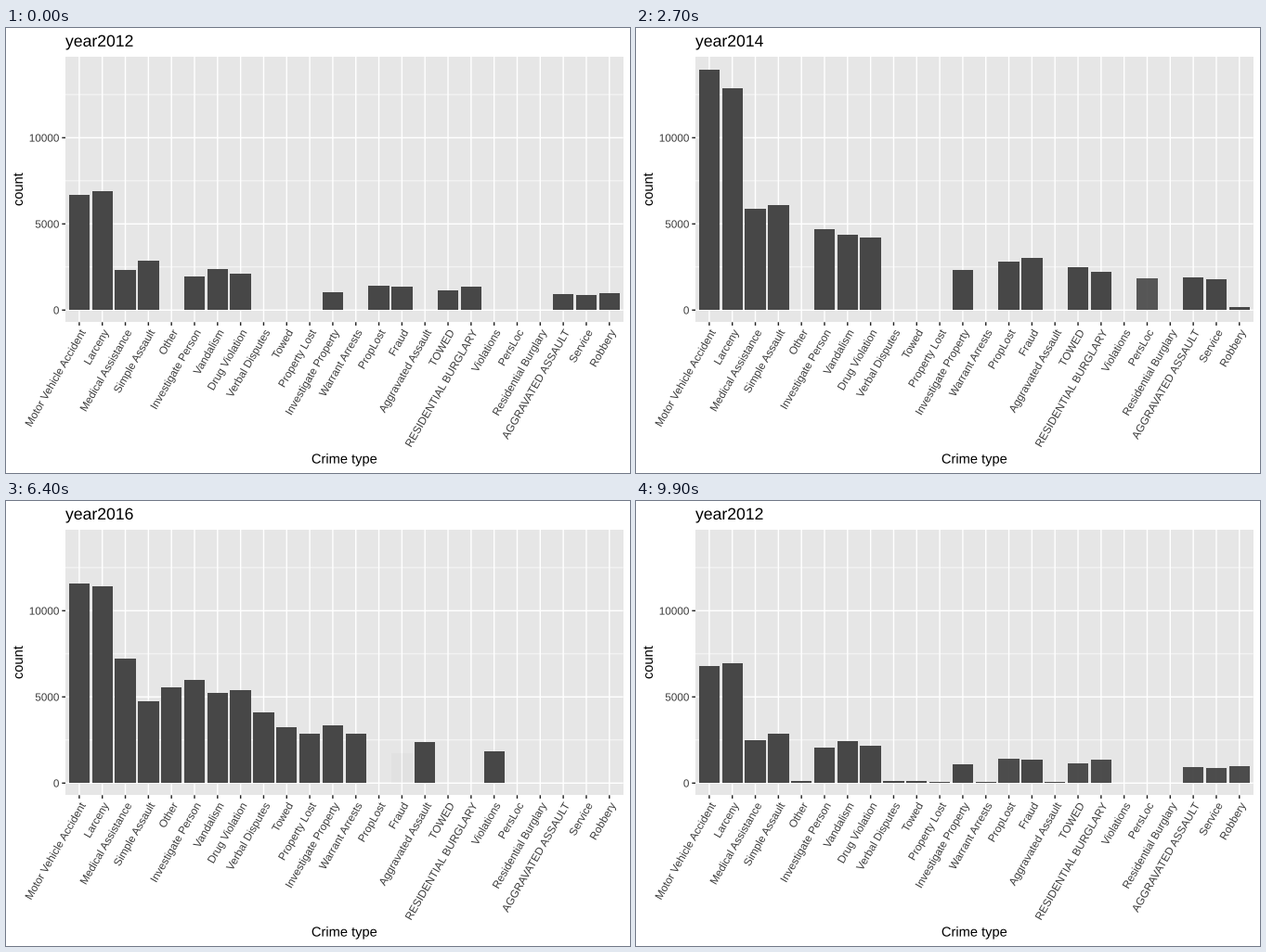
Write a matplotlib script that moves like this. It is 672x480 px and loops after 10 s.

```python
import math

import matplotlib.pyplot as plt
import numpy as np
from matplotlib.animation import FuncAnimation
from matplotlib.patches import PathPatch, Rectangle
from matplotlib.textpath import TextPath
from matplotlib.transforms import Affine2D

plt.rcParams["font.family"] = "Liberation Sans"

W, H, DPI = 672, 480, 96
PT = DPI / 72
LEFT, RIGHT, TOP, BOTTOM = 64.0, 664.67, 31.0, 317.3
Y_MAX = 14000
PANEL, BAR, TICK, LABEL = "#e6e6e6", "#474747", "#242424", "#3b3b3b"

YEARS = range(2012, 2019)
LAST_FULL = 2017
SHARE = {2012: 0.5, 2018: 0.86}  # parts of a year on record
TOP_N = 15                       # bars shown per year

ALL, OLD, NEW = (2012, 2017), (2012, 2014), (2015, 2017)

# category, span of years, yearly rates at even steps across the span
SERIES = [
    ("Motor Vehicle Accident", ALL, [13380, 13610, 14000, 12715, 11546, 12030]),
    ("Larceny", ALL, [13760, 12680, 12920, 13605, 11455, 10995]),
    ("Medical Assistance", ALL, [4700, 7820]),
    ("Simple Assault", ALL, [5700, 6110, 6077, 5885, 4725, 4915]),
    ("Other", NEW, [4086, 5547, 5350]),
    ("Investigate Person", ALL, [3880, 4950, 6640]),
    ("Vandalism", ALL, [4720, 4100, 5500, 4800]),
    ("Drug Violation", ALL, [4180, 3850, 5900, 4750]),
    ("Verbal Disputes", NEW, [1884, 4070, 4430]),
    ("Towed", NEW, [1920, 3208, 3935]),
    ("Property Lost", NEW, [1911, 2862, 3130]),
    ("Investigate Property", ALL, [2040, 2450, 3945]),
    ("Warrant Arrests", (2016, 2017), [2841, 3155]),
    ("PropLost", OLD, [2820]),
    ("Fraud", ALL, [2680, 3300, 2020, 1726]),
    ("Aggravated Assault", NEW, [1761, 2378, 2437]),
    ("TOWED", OLD, [2340, 2480]),
    ("RESIDENTIAL BURGLARY", OLD, [2700, 2185]),
    ("Violations", (2016, 2016), [1920]),
    ("PersLoc", (2014, 2014), [1840]),
    ("Residential Burglary", (2015, 2015), [1773]),
    ("AGGRAVATED ASSAULT", OLD, [1910]),
    ("Service", OLD, [1785]),
    ("Robbery", (2012, 2013), [1930]),
]

HOLD = 5  # still frames before each move

STEP = (RIGHT - LEFT) / (len(SERIES) + 0.2)
BAR_W = 0.9 * STEP
UNIT = (BOTTOM - TOP) / (1.1 * Y_MAX)
ZERO = BOTTOM - 0.05 * Y_MAX * UNIT


def x_pos(i):
    return LEFT + (i + 0.6) * STEP


def y_pos(value):
    return ZERO - value * UNIT


def count(span, rates, year):
    first, last = span
    y = min(year, LAST_FULL)
    if not first <= y <= last:
        return 0
    rate = np.interp(y, np.linspace(first, last, len(rates)), rates)
    return rate * SHARE.get(year, 1)


def top_counts(year):
    row = np.array([count(span, rates, year) for _, span, rates in SERIES])
    return np.where(row >= np.sort(row)[-TOP_N], row, 0)


fig = plt.figure(figsize=(W / DPI, H / DPI), dpi=DPI, facecolor="white")
ax = fig.add_axes([0, 0, 1, 1])
ax.set_xlim(0, W)
ax.set_ylim(H, 0)
ax.axis("off")


def line(xs, ys, color, px, z):
    ax.plot(xs, ys, color=color, lw=px / PT, solid_capstyle="butt",
            zorder=z, snap=False)


def box(x, y, w, h, color, z):
    return ax.add_patch(Rectangle((x, y), w, h, facecolor=color, lw=0,
                                  zorder=z, snap=True))


def advance(text, px):
    def ink_end(s):
        return TextPath((0, 0), s, size=px).get_extents().x1
    return ink_end(text + "l") - ink_end("l")


def label(x, y, text, pt, color="black", align=0.0, angle=0):
    """Text as an outline, so it can sit between pixels."""
    px = pt * PT
    path = TextPath((-align * advance(text, px), 0), text, size=px)
    place = Affine2D().scale(1, -1).rotate_deg(-angle).translate(x, y)
    return ax.add_patch(PathPatch(path, facecolor=color, lw=0, zorder=4,
                                  snap=False, transform=place + ax.transData))


box(LEFT, TOP, RIGHT - LEFT, BOTTOM - TOP, PANEL, 0)
for v in range(2500, Y_MAX, 5000):
    line([LEFT, RIGHT], [y_pos(v)] * 2, "white", 0.71, 1)

CAP = 0.718 * 8.8 * PT
for v in range(0, Y_MAX, 5000):
    y = y_pos(v)
    line([LEFT, RIGHT], [y, y], "white", 1.42, 1)
    line([LEFT - 3.67, LEFT], [y, y], TICK, 1.42, 3)
    label(LEFT - 6.6, y + CAP / 2, str(v), 8.8, LABEL, align=1)

tilt = math.radians(60)
for i, (name, _, _) in enumerate(SERIES):
    x = x_pos(i)
    line([x, x], [TOP, BOTTOM], "white", 1.42, 1)
    line([x, x], [BOTTOM, BOTTOM + 3.67], TICK, 1.42, 3)
    label(x + CAP * math.sin(tilt), BOTTOM + 6.6 + CAP * math.cos(tilt),
          name, 8.8, LABEL, align=1, angle=60)

label((LEFT + RIGHT) / 2, 469.6, "Crime type", 11, align=0.5)
label(17.9, (TOP + BOTTOM) / 2, "count", 11, align=0.5, angle=90)
titles = [label(LEFT, 19.9, f"year{year}", 13.2) for year in YEARS]

table = [top_counts(year) for year in YEARS]
bars = [box(x_pos(i) - BAR_W / 2, ZERO, BAR_W, 0, BAR, 2)
        for i in range(len(SERIES))]


def progress(frame):
    """Year index before the move and the share of the move done."""
    start = 0
    for state in range(len(YEARS)):
        steps = 10 if state < 3 else 9
        length = steps + (HOLD if state < 4 else HOLD)
        if frame < start + length:
            break
        start += length
    return state, max(0, frame - start - HOLD + 1) / steps


def draw(frame):
    state, t = progress(frame)
    nxt = (state + 1) % len(YEARS)
    ease = (1 - math.cos(math.pi * t)) / 2
    for bar, a, b in zip(bars, table[state], table[nxt]):
        entering = a == 0 and b > 0
        # new bars fade in at full height, leaving bars shrink
        value = b if entering else a + (b - a) * ease
        bar.set_y(y_pos(value))
        bar.set_height(value * UNIT)
        bar.set_alpha(ease if entering else 1.0)
        bar.set_visible(bool(value > 0))
    shown = nxt if t > 0.5 else state
    for i, title in enumerate(titles):
        title.set_visible(i == shown)
    return [*bars, *titles]


anim = FuncAnimation(fig, draw, frames=100, interval=100, repeat=True,
                     repeat_delay=0, blit=False)
plt.show()
```
